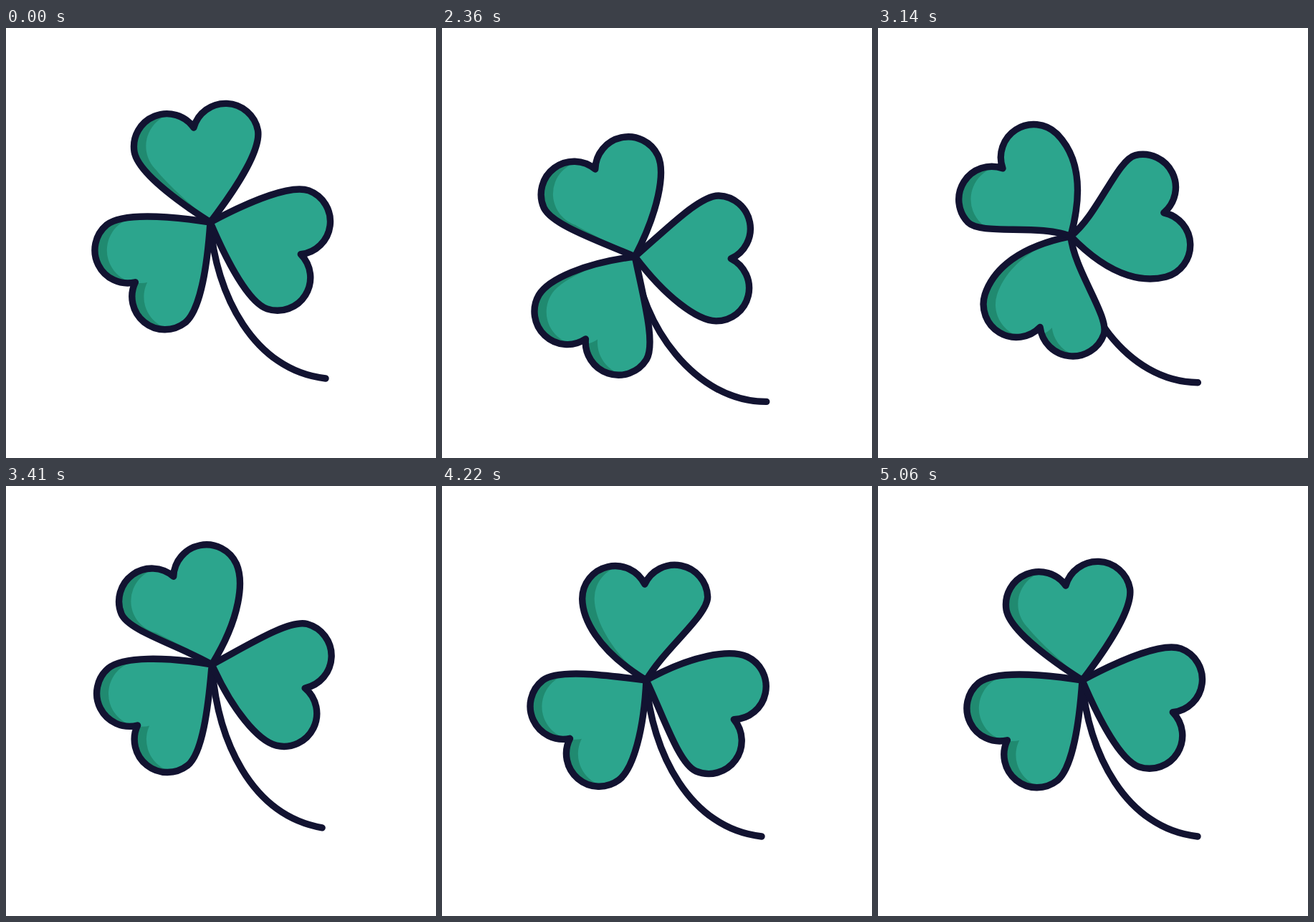
An HTML page that plays this animation: 600 by 600 pixels, repeating every 5.12 s.

```html
<!DOCTYPE html>
<html lang="en">
<head>
<meta charset="utf-8">
<title>Shamrock</title>
<style>
  html, body { margin: 0; width: 100%; height: 100%; overflow: hidden; background: #fff; }
  svg { display: block; width: 100vw; height: 100vh; }
  .line { fill: none; stroke: #121331; stroke-width: 9.4; stroke-linecap: round; stroke-linejoin: round; }
  .shade { fill: #208a70; }
  .lit { fill: #2ca58d; }
</style>
</head>
<body>
<svg id="stage" viewBox="0 0 600 600"></svg>
<script>
const LOOP = 5120, START = 2030, END = 5060, STEP = 30;

// "lag" delays a leaf's swing; "shift" moves each lobe's light area off its shaded side.
const LEAVES = [
  { angle: -128.7, lag: 0, shift: [17, 17] },
  { angle: 109.5, lag: 50, shift: [0, 0] },
  { angle: -9.9, lag: 160, shift: [17, 0] }
];
const LOBE = { x: 41.5, y: 115, r: 46, notch: 134 };
const SIDE = LOBE.x + LOBE.r;

// Sine easing through [time, value] keys.
function ease(t, ...keys) {
  const next = keys.findIndex(([time]) => time > t);
  if (next === 0) return keys[0][1];
  if (next < 0) return keys[keys.length - 1][1];
  const [t0, v0] = keys[next - 1], [t1, v1] = keys[next];
  return v0 + (v1 - v0) * (1 - Math.cos(Math.PI * (t - t0) / (t1 - t0))) / 2;
}

const hubAt = t => ({
  x: ease(t, [2000, 285], [2660, 257.5], [2820, 257.5], [3720, 298], [4200, 285]),
  y: ease(t, [2000, 271], [2660, 355], [3530, 244], [4200, 271])
});
const stemEndAt = t => ({
  x: ease(t, [2000, 446], [2650, 457.5], [3450, 441], [4200, 446]),
  y: ease(t, [2000, 489], [2600, 538.5], [3450, 476.5], [4200, 489])
});
const swingAt = (t, lag) => ease(t, [2000, 0], [2700 + lag, -39], [2990, -39],
  [3710 + lag, 22 - lag * 0.04], [4450 + lag * 2, -4.5], [END, 0]);
const bendAt = (t, lag) => ease(t, [2000, 0], [3050, 30], [3760 + lag * 2, -24], [4400 + lag * 2.5, 0]);
const sizeAt = (t, lag) => ease(t, [3450, 1], [3710, 1 - lag * 0.00028], [4050, 1]);

const stage = document.getElementById('stage');
function add(parent, tag, attrs) {
  const el = document.createElementNS('http://www.w3.org/2000/svg', tag);
  for (const key in attrs) el.setAttribute(key, attrs[key]);
  return parent.appendChild(el);
}

const stem = add(stage, 'path', { class: 'line' });
LEAVES.forEach((leaf, i) => {
  const clip = add(stage, 'clipPath', { id: 'leaf' + i });
  leaf.clip = add(clip, 'path', {});
  leaf.shade = add(stage, 'path', { class: 'shade' });
  leaf.lit = add(stage, 'path', { class: 'lit', 'clip-path': `url(#leaf${i})` });
  leaf.line = add(stage, 'path', { class: 'line' });
});

const point = (x, y) => x.toFixed(2) + ' ' + y.toFixed(2);

// The handles follow from how far the end hangs below the hub.
function drawStem(hub, end) {
  const drop = end.y - hub.y;
  stem.setAttribute('d', `M${point(hub.x, hub.y)}C${point(hub.x + 7, hub.y + drop * 0.46)} `
    + `${point(end.x - 100, end.y - 0.72 * (drop - 203))} ${point(end.x, end.y)}`);
}

function drawLeaf(leaf, t, hub) {
  const angle = (leaf.angle + swingAt(t, leaf.lag)) * Math.PI / 180;
  const bend = bendAt(t, leaf.lag), size = sizeAt(t, leaf.lag);
  const sin = Math.sin(angle) * size, cos = Math.cos(angle) * size;
  // x runs across the leaf, y from hub to notch, dx is a shift on the stage.
  const at = (x, y, dx = 0) => point(hub.x + x * cos + y * sin + dx, hub.y + x * sin - y * cos);
  const r = LOBE.r * size;
  const arc = to => `A${r} ${r} 0 0 1 ${to}`;
  const rise = dx => `M${at(0, 0)}C${at(-48 + bend, 44, dx)} ${at(-SIDE, 89, dx)} ${at(-SIDE, LOBE.y, dx)}`;
  const fall = dx => `C${at(SIDE, 89, dx)} ${at(48 + bend, 44, dx)} ${at(0, 0)}Z`;
  const circle = (x, dx) => `M${at(x - LOBE.r, LOBE.y, dx)}` + arc(at(x + LOBE.r, LOBE.y, dx))
    + arc(at(x - LOBE.r, LOBE.y, dx)) + 'Z';

  const outline = rise(0) + arc(at(0, LOBE.notch)) + arc(at(SIDE, LOBE.y)) + fall(0);
  const [left, right] = leaf.shift;
  const light = rise(left) + `L${at(0, LOBE.notch, right)}L${at(SIDE, LOBE.y, right)}` + fall(right)
    + circle(-LOBE.x, left) + circle(LOBE.x, right);
  for (const part of [leaf.clip, leaf.shade, leaf.line]) part.setAttribute('d', outline);
  leaf.lit.setAttribute('d', light);
}

function draw(time) {
  let t = time % LOOP;
  t = t < START || t >= END ? 0 : START + Math.floor((t - START) / STEP) * STEP;
  const hub = hubAt(t);
  drawStem(hub, stemEndAt(t));
  for (const leaf of LEAVES) drawLeaf(leaf, t, hub);
}

const begin = performance.now();
function tick() {
  draw(performance.now() - begin);
  requestAnimationFrame(tick);
}
tick();
</script>
</body>
</html>
```
